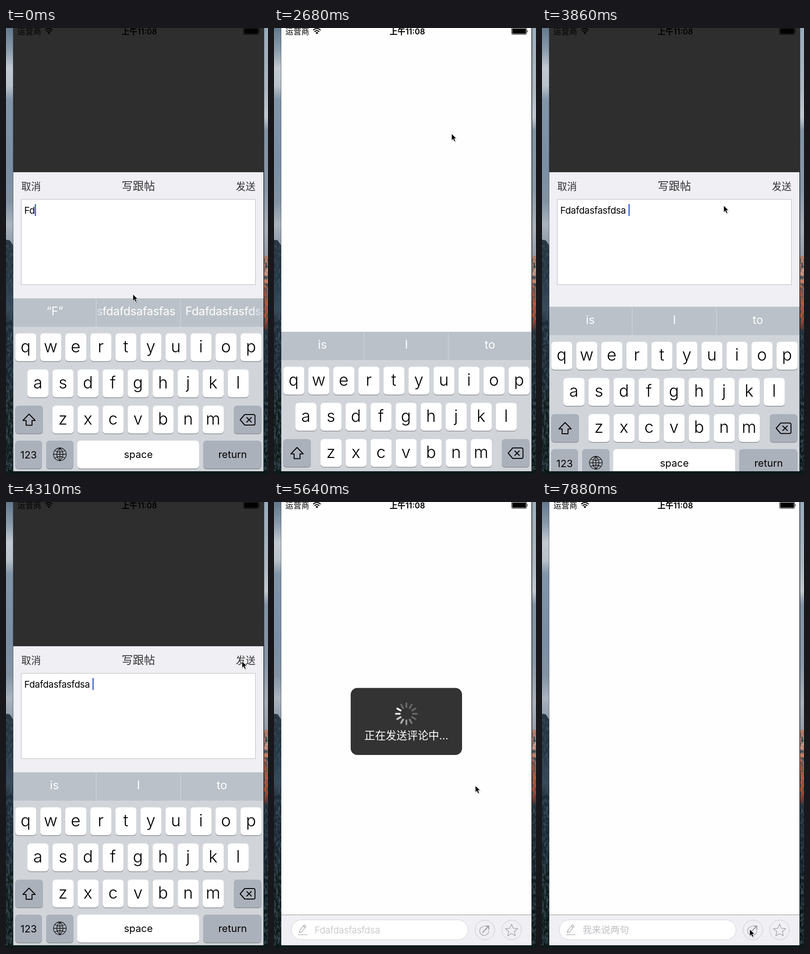
Write an HTML page that moves like this. It is 574x975 px and loops after 8 s.

```html
<!DOCTYPE html>
<html lang="zh-CN">
<head>
<meta charset="utf-8">
<style>
html, body { margin: 0; width: 100%; height: 100%; overflow: hidden; background: #101c20; }
svg { display: block; width: 100vw; height: 100vh; }
text { font-family: Inter, "Noto Sans CJK SC", "Noto Sans CJK", sans-serif; white-space: pre; }
.mid { text-anchor: middle; }
.line { fill: none; stroke-linecap: round; stroke-linejoin: round; }
</style>
</head>
<body>
<svg id="stage" viewBox="0 0 574 975" preserveAspectRatio="none"></svg>
<script>
const LOOP = 8000, STEP = 148.35;
const DRAFT = 'Fdafdasfasfdsa';

// Small markup helpers
const rect = (x, y, w, h, fill, r = 0, more = '') =>
  `<rect x="${x}" y="${y}" width="${w}" height="${h}" rx="${r}" fill="${fill}" ${more}/>`;
const text = (x, y, size, str, more = '') =>
  `<text x="${x}" y="${y}" font-size="${size}" ${more}>${str}</text>`;
const mid = (x, y, size, str, more = '') => text(x, y, size, str, `class="mid" ${more}`);
const line = (d, stroke, width, more = '') =>
  `<path class="line" d="${d}" stroke="${stroke}" stroke-width="${width}" ${more}/>`;
const group = (id, body, more = '') => `<g id="${id}" ${more}>${body}</g>`;
const gradient = (id, coords, stops) =>
  `<linearGradient id="${id}" gradientUnits="userSpaceOnUse" ${coords}>` +
  stops.map(([o, c, a = 1]) => `<stop offset="${o}" stop-color="${c}" stop-opacity="${a}"/>`).join('') +
  '</linearGradient>';

const down = 'x1="0" y1="0" x2="0" y2="975"';
const defs = `<defs>
  <clipPath id="window"><rect x="16" width="548" height="969"/></clipPath>
  <clipPath id="middle"><rect x="198" y="591" width="183" height="62"/></clipPath>
  <filter id="grain" x="0" y="0" width="1" height="1">
    <feTurbulence type="fractalNoise" baseFrequency=".22 .12" numOctaves="3" seed="4"/>
    <feColorMatrix values="0 0 0 0 .04  0 0 0 0 .07  0 0 0 0 .09  3 0 0 0 -1.2"/>
  </filter>
  ${gradient('skyLeft', down, [[0, '#64798e'], [.05, '#8b9cac'], [.09, '#c2c9d0'], [.13, '#b9c2ca'],
    [.16, '#8296a9'], [.3, '#7a8fa5'], [.39, '#8393a4'], [.44, '#aab3be'], [.49, '#8d99a8']])}
  ${gradient('rockLeft', down, [[.47, '#2a3743'], [.55, '#203141'], [.63, '#394b5e'], [.66, '#1d2c39'],
    [.8, '#15232e'], [.83, '#111d1d'], [1, '#0b1715']])}
  ${gradient('skyRight', down, [[0, '#9aabb9'], [.14, '#adb7c0'], [.2, '#c2c8cd'], [.23, '#8292a3'],
    [.36, '#8997a6'], [.45, '#a9afb9'], [.51, '#979da9']])}
  ${gradient('rockRight', down, [[.51, '#b07866'], [.55, '#d09c8a'], [.59, '#c46245'], [.65, '#b64d31'],
    [.67, '#6b342b'], [.68, '#212e39'], [.8, '#14212b'], [1, '#091410']])}
  ${gradient('fadeStart', 'x1="197" y1="0" x2="216" y2="0"', [[0, '#fff', .3], [1, '#fff']])}
  ${gradient('fadeEnd', 'x1="538" y1="0" x2="564" y2="0"', [[0, '#fff'], [1, '#fff', .15]])}
</defs>`;

const wallpaper =
  rect(0, 0, 17, 975, 'url(#skyLeft)') + '<path d="M0 463L8 464L16 476V975H0Z" fill="url(#rockLeft)"/>' +
  rect(563, 0, 11, 975, 'url(#skyRight)') + '<path d="M563 508L568 497L574 499V975H563Z" fill="url(#rockRight)"/>' +
  rect(0, 475, 16, 500, '#000', 0, 'filter="url(#grain)"') +
  rect(564, 505, 10, 470, '#000', 0, 'filter="url(#grain)"') +
  rect(0, 969, 574, 6, '#0c191a') + rect(15, 0, 1, 969, '#263442', 0, 'opacity=".6"') +
  rect(564, 0, 1.5, 969, '#1d242b');

const statusBar =
  text(25, 13.5, 17.4, '运营商') +
  line('M86.5 4.2A11 11 0 0 1 101.5 4.2M89.5 7.6A7 7 0 0 1 98.5 7.6', '#000', 2.2) +
  '<path d="M94 13.5L91 10.4A4.3 4.3 0 0 1 97 10.4Z"/>' +
  mid(292, 13.5, 17.4, '上午11:08', 'font-weight="600"') +
  rect(520.5, -.5, 33, 14.5, 'none', 2.5, 'stroke="#000"') + rect(522, 1, 30, 11.5, '#000', 1) +
  '<path d="M554.5 4.5Q557 7 554.5 9.5Z"/>';

const starPoints = Array.from({ length: 10 }, (_, i) => {
  const r = i % 2 ? 6.4 : 14, a = i * Math.PI / 5;
  return `${(520.5 + r * Math.sin(a)).toFixed(1)} ${(937 - r * Math.cos(a)).toFixed(1)}`;
}).join('L');
const toolbar =
  rect(16, 902, 548, 67, '#efeff4') + rect(16, 902, 548, 1, '#939398') +
  rect(38, 913.5, 387, 43.5, '#fff', 21.7, 'stroke="#cfcfd4"') +
  line('M53 946H72.5M55.5 941.5L57 936L66 924.5L70 927.5L61 939.5Z M64 927L68 930', '#9a9a9f', 1.2) +
  text(89, 943, 20.3, '', 'id="hint" fill="#bfbfc4" font-weight="300"') +
  [462, 520.5].map(x => `<circle cx="${x}" cy="935.5" r="21.5" fill="none" stroke="#c5c5ca"/>`).join('') +
  line('M460 927.6A10 10 0 1 0 470.5 938', '#a0a0a5', 1.3) +
  line('M457 941L470 927.5M463 927H470.5V934.5', '#98989d', 2) +
  line(`M${starPoints}Z`, '#98989d', 1.2);

const LABEL = 'fill="#333335" font-weight="300"';
const composer =
  rect(16, 0, 548, 315, '#000', 0, 'opacity=".82"') + rect(16, 314.4, 548, 1, '#0c0c0c') +
  rect(16, 315.4, 548, 654, '#efeff4') +
  text(33.5, 353.5, 21.5, '取消', LABEL) +
  mid(290, 354, 24.4, '写跟帖', LABEL) +
  text(546.5, 353.5, 21.5, '发送', `${LABEL} text-anchor="end"`) +
  rect(33.5, 374.5, 513, 186.5, '#fff', 0, 'stroke="#b8b8be"') +
  text(40, 406, 20.4, '', 'id="typed" letter-spacing="-.3"') +
  rect(63, 385, 2.8, 26, '#4365df', 0, 'id="caret"');

// Keyboard
const key = (x, y, w, fill = '#fff') =>
  rect(x, y + 1.6, w, 61, '#898c90', 7) + rect(x, y, w, 61, fill, 7);
const letterRow = (letters, x, y) => [...letters].map((c, i) => {
  const left = x + i * 54.85;
  return key(left, y, 46) + mid(left + 22.7, y + 41, 36.5, c, 'font-weight="350"');
}).join('');
const DARK_KEY = '#abb1bb';
const keyboard =
  rect(16, 591, 548, 378, '#d1d5da') + rect(16, 591, 548, 62, '#bac1c9') +
  rect(197, 591, 1, 62, '#d6dade') + rect(381.5, 591, 1, 62, '#d6dade') +
  group('guesses',
    mid(107, 628, 25, '“F”') +
    `<g clip-path="url(#middle)">${text(371, 628, 25.4, 'sfdafdsafasfas',
      'text-anchor="end" fill="url(#fadeStart)" letter-spacing="-.3"')}</g>` +
    text(393, 628, 25.4, DRAFT, 'fill="url(#fadeEnd)" letter-spacing="-.3"'), 'fill="#fff"') +
  group('words', mid(106, 628, 25, 'is') + mid(290, 628, 25, 'I') + mid(473, 628, 25, 'to'), 'fill="#fff"') +
  letterRow('qwertyuiop', 20.3, 667.5) + letterRow('asdfghjkl', 47, 746.5) + letterRow('zxcvbnm', 102, 825.5) +
  key(20.3, 825.5, 60.7, DARK_KEY) + key(499, 825.5, 60.5, DARK_KEY) +
  line('M50.5 844L64 858H57V868.5H44V858H37Z', '#000', 2) +
  line('M523 845H542Q545.5 845 545.5 848.5V865Q545.5 868 542 868H523L513 856.5Z' +
    'M527.5 851.5L537.5 861.5M537.5 851.5L527.5 861.5', '#000', 2) +
  key(20.3, 902, 58.7, DARK_KEY) + key(88, 902, 60, DARK_KEY) +
  key(156, 902, 267) + key(432, 902, 127.5, DARK_KEY) +
  mid(49.5, 941, 22, '123') + mid(290, 940, 22, 'space') + mid(496.5, 940, 22, 'return') +
  line('M104 932A14 14 0 1 1 132 932A14 14 0 1 1 104 932H132M118 918V946' +
    'M118 918Q104.5 932 118 946Q131.5 932 118 918M107 924Q118 930 129 924M107 940Q118 934 129 940', '#111', 1.3);

const hud =
  rect(168, 406.5, 244, 146.5, '#333', 14.6) +
  group('spokes', Array.from({ length: 12 }, (_, i) =>
    line('M290 448.5V440', '#fff', 4, `transform="rotate(${i * 30} 290 463)"`)).join('')) +
  mid(290, 518.5, 23.4, '正在发送评论中...', 'fill="#fff"');

const pointer =
  '<path d="M1 2V17L4.5 13.7L7 19.3L10 18L7.6 12.6H12Z" fill="#000" opacity=".2"/>' +
  '<path d="M0 0V14.8L3.4 11.7L5.8 17.2L8.6 16L6.2 10.6H11Z" fill="#000" stroke="#fff" stroke-width="1"/>';

const stage = document.getElementById('stage');
stage.innerHTML = defs + wallpaper +
  `<g clip-path="url(#window)">${rect(16, 0, 548, 969, '#fefefe')}${statusBar}${toolbar}` +
  group('composer', composer) + group('keyboard', keyboard) + group('hud', hud) + '</g>' +
  group('pointer', pointer);

const el = id => document.getElementById(id);
const show = (id, on) => el(id).setAttribute('visibility', on ? 'inherit' : 'hidden');

// Tables of [tick, value, ...]; one tick lasts STEP ms
const POINTER = [[0, 278, 582], [4, 428, 622], [6, 428, 622], [9, 314, 616], [10, 314, 616], [12, 54, 350],
  [13, 60, 348], [15, 472, 345], [16, 425, 297], [17, 389, 231], [18, 389, 231], [22, 270, 930],
  [24, 270, 930], [26, 398, 388], [29, 517, 348], [33, 517, 348], [38, 441, 620], [47, 441, 620],
  [50, 390, 790], [53, 455, 934]];
const KEYBOARD_DROP = [[17, 0], [18, 73], [19, 320], [20, 378], [24, 378], [25, 200], [26, 18.5], [27, 0],
  [30, 0], [31, 189], [32, 345], [33, 378]];
const HUD_ALPHA = [[30, 0], [31, .19], [32, .75], [33, 1], [43, 1], [44, .7], [45, .172], [46, 0]];

function sample(table, tick, ease = u => u) {
  const next = table.findIndex(row => row[0] > tick);
  if (next === 0) return table[0].slice(1);
  if (next < 0) return table[table.length - 1].slice(1);
  const a = table[next - 1], b = table[next], u = ease((tick - a[0]) / (b[0] - a[0]));
  return a.slice(1).map((v, i) => v + (b[i + 1] - v) * u);
}
const smooth = u => u * u * (3 - 2 * u);

function render(time) {
  const tick = Math.min(53, Math.floor(time / STEP));
  const done = tick >= 6;
  const composing = tick < 18 || (tick >= 25 && tick < 31);

  show('composer', composing);
  show('guesses', !done);
  show('words', done);
  el('typed').textContent = done ? DRAFT : 'Fd';
  el('caret').setAttribute('x', done ? 189.4 : 63);
  show('caret', composing && ![3, 4, 13, 14].includes(tick));
  el('hint').textContent = tick < 45 ? DRAFT : '我来说两句';

  el('keyboard').setAttribute('transform', `translate(0 ${sample(KEYBOARD_DROP, tick)[0]})`);
  el('hud').setAttribute('opacity', sample(HUD_ALPHA, tick)[0]);
  el('pointer').setAttribute('transform', `translate(${sample(POINTER, tick, smooth).join(' ')})`);

  const lead = Math.floor(tick * STEP * 12 / 1000) + 3;
  [...el('spokes').children].forEach((spoke, i) => {
    const behind = (((lead - i) % 12) + 12) % 12;
    spoke.setAttribute('opacity', Math.max(.25, 1 - behind * .13));
  });
}

const start = performance.now();
function loop() {
  render((performance.now() - start) % LOOP);
  requestAnimationFrame(loop);
}
loop();
</script>
</body>
</html>
```
